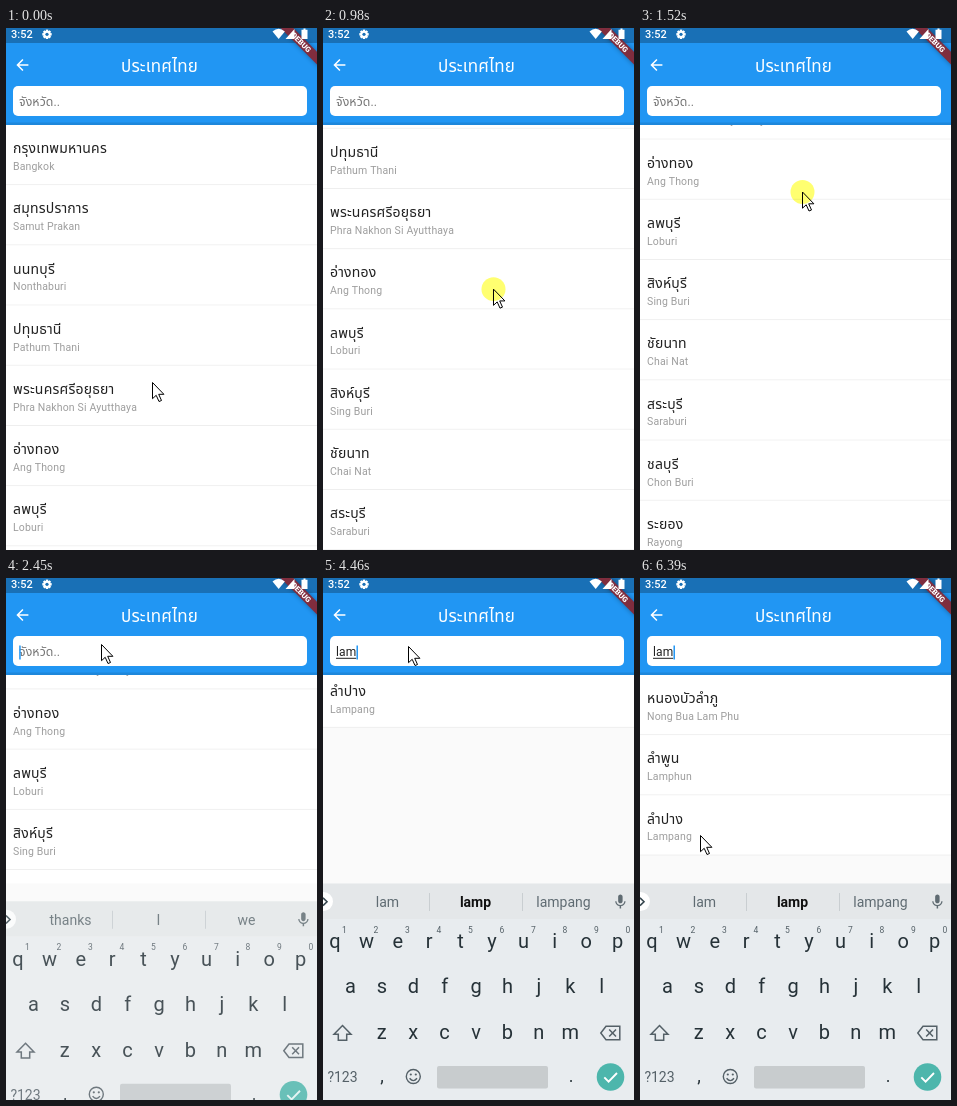
Animation of 311 by 522 pixels, one loop 6.77 s. Source, as an HTML page with a canvas:

```html
<!DOCTYPE html>
<html lang="th">
<head>
<meta charset="utf-8">
<style>
html, body { margin: 0; width: 100%; height: 100%; overflow: hidden; background: #fff; }
canvas { display: block; width: 311px; height: 522px; }
</style>
</head>
<body>
<canvas id="stage"></canvas>
<script>
const W = 311, H = 522, LOOP = 6770;
const LIST_TOP = 97, ROW = 60.2, KEYS_TOP = 305.5;
const THAI = "Roboto, 'Noto Sans Thai Looped', 'Noto Sans Thai', 'Noto Sans', sans-serif";
const LATIN = "Roboto, 'Noto Sans', sans-serif";

const FOCUS = 2345, KEYS_IN = 2400;
const TYPED = [[3915, 'l'], [4140, 'la'], [4385, 'lam']];
const PRESSES = [[560, 1660], [2130, 2310]];
const HINTS = {
  '': ['thanks', 'I', 'we'],
  l: ['l', 'lol', 'like'],
  la: ['la', 'last', 'lab'],
  lam: ['lam', 'lamp', 'lampang']
};
const PROVINCES = [
  ['กรุงเทพมหานคร', 'Bangkok'], ['สมุทรปราการ', 'Samut Prakan'],
  ['นนทบุรี', 'Nonthaburi'], ['ปทุมธานี', 'Pathum Thani'],
  ['พระนครศรีอยุธยา', 'Phra Nakhon Si Ayutthaya'], ['อ่างทอง', 'Ang Thong'],
  ['ลพบุรี', 'Loburi'], ['สิงห์บุรี', 'Sing Buri'], ['ชัยนาท', 'Chai Nat'],
  ['สระบุรี', 'Saraburi'], ['ชลบุรี', 'Chon Buri'], ['ระยอง', 'Rayong'],
  ['จันทบุรี', 'Chanthaburi'], ['หนองบัวลำภู', 'Nong Bua Lam Phu'],
  ['เลย', 'Loei'], ['กาฬสินธุ์', 'Kalasin'], ['ลำพูน', 'Lamphun'],
  ['ลำปาง', 'Lampang'], ['พิษณุโลก', 'Phitsanulok'], ['สงขลา', 'Songkhla'],
  ['พัทลุง', 'Phatthalung'], ['ยะลา', 'Yala']
];
// time, x, y of the pointer tip
const POINTER = [
  [70, 146, 354], [430, 153, 499], [540, 154, 494], [640, 156, 442],
  [980, 170, 261], [1200, 168, 200], [1360, 165, 175], [1500, 162, 163.5],
  [1660, 162, 163.5], [1980, 98, 62], [2090, 98, 62], [2130, 95, 66],
  [3200, 95, 66], [3380, 85, 68], [5500, 85, 68], [5960, 60, 257]
];

const canvas = document.getElementById('stage');
const ctx = canvas.getContext('2d');
const dpr = window.devicePixelRatio || 1;
canvas.width = W * dpr;
canvas.height = H * dpr;

function rect(x, y, w, h, fill) {
  ctx.fillStyle = fill;
  ctx.fillRect(x, y, w, h);
}

function round(x, y, w, h, r, fill) {
  ctx.beginPath();
  ctx.roundRect(x, y, w, h, r);
  ctx.fillStyle = fill;
  ctx.fill();
}

function disc(x, y, r, fill) {
  ctx.beginPath();
  ctx.arc(x, y, r, 0, 7);
  ctx.fillStyle = fill;
  ctx.fill();
}

function text(str, x, y, size, fill, { align = 'left', weight = 400, family = LATIN, gap = 0 } = {}) {
  ctx.font = `${weight} ${size}px ${family}`;
  ctx.letterSpacing = gap + 'px';
  ctx.textAlign = align;
  ctx.fillStyle = fill;
  ctx.fillText(str, x, y);
}

function icon(d, x, y, scale, fill) {
  ctx.save();
  ctx.translate(x, y);
  ctx.scale(scale, scale);
  ctx.fillStyle = fill;
  ctx.fill(new Path2D(d));
  ctx.restore();
}

function line(d, color, width) {
  ctx.strokeStyle = color;
  ctx.lineWidth = width;
  ctx.stroke(new Path2D(d));
}

// Monotone cubic through keyed values
function track(keys, col, t) {
  const n = keys.length - 1;
  if (t <= keys[0][0]) return keys[0][col];
  if (t >= keys[n][0]) return keys[n][col];
  let i = 0;
  while (keys[i + 1][0] < t) i++;
  const slope = k => k < 0 || k >= n ? 0 :
    (keys[k + 1][col] - keys[k][col]) / (keys[k + 1][0] - keys[k][0]);
  const tangent = k => {
    const a = slope(k - 1), b = slope(k);
    return a * b > 0 ? 2 * a * b / (a + b) : 0;
  };
  const span = keys[i + 1][0] - keys[i][0], u = (t - keys[i][0]) / span, v = 1 - u;
  return keys[i][col] * (1 + 2 * u) * v * v + tangent(i) * span * u * v * v +
    keys[i + 1][col] * u * u * (3 - 2 * u) - tangent(i + 1) * span * u * u * v;
}

function typedAt(t) {
  let state = [FOCUS, ''];
  for (const entry of TYPED) if (t >= entry[0]) state = entry;
  return state;
}

const matches = query => PROVINCES.filter(p => p[1].toLowerCase().includes(query));

// Overdamped settling from 1 to 0
function settle(ms) {
  const s = ms / 1000;
  return 1.7 * Math.exp(-9.08 * s) - 0.7 * Math.exp(-22.03 * s);
}

function scrollAt(t) {
  if (t < PRESSES[0][0]) return 0;
  const [, [la], [lam]] = TYPED;
  if (t < la) return Math.max(0, 450 - track(POINTER, 2, Math.min(t, 1660) - 32));
  if (t < lam) {
    const end = matches('la').length * ROW - (KEYS_TOP - LIST_TOP);
    return end + (scrollAt(la - 1) - end) * settle(t - la);
  }
  return scrollAt(lam - 1) * settle(t - lam);
}

function drawList(t, query) {
  const bottom = t < KEYS_IN ? H : KEYS_TOP;
  const scroll = scrollAt(t);
  rect(0, LIST_TOP, W, H, '#fafafa');
  ctx.save();
  ctx.beginPath();
  ctx.rect(0, LIST_TOP, W, bottom - LIST_TOP);
  ctx.clip();
  matches(query).forEach(([thai, latin], i) => {
    const y = LIST_TOP + i * ROW - scroll;
    if (y < LIST_TOP - ROW || y > bottom) return;
    rect(0, y, W, ROW, '#fff');
    rect(0, y + ROW - 1, W, 1, '#eee');
    text(thai, 7, y + 28.2, 14, '#212121', { weight: 300, family: THAI, gap: 0.19 });
    text(latin, 7, y + 45, 10.5, '#9e9e9e', { gap: 0.15 });
  });
  ctx.restore();
}

function drawBanner() {
  ctx.save();
  ctx.translate(295.3, 14.4);
  ctx.rotate(Math.PI / 4);
  ctx.shadowColor = 'rgba(0,0,0,.35)';
  ctx.shadowBlur = 5 * dpr;
  rect(-30, -4.5, 60, 9, 'rgb(127,45,62)');
  ctx.shadowColor = 'transparent';
  text('DEBUG', 0, 2.7, 7.6, '#fff', { align: 'center', weight: 900 });
  ctx.restore();
}

function drawStatus() {
  text('3:52', 5, 10.4, 11, '#fff', { weight: 500 });
  ctx.save();
  ctx.translate(41, 6.3);
  for (let i = 0; i < 4; i++) {
    rect(-1.2, -4.7, 2.4, 9.4, '#fff');
    ctx.rotate(Math.PI / 4);
  }
  ctx.restore();
  disc(41, 6.3, 3.6, '#fff');
  disc(41, 6.3, 1.6, '#1970b6');
  icon('M0 3Q6.5 -2.5 13 3L6.5 11Z', 266.5, 0.6, 0.95, '#fff');
  icon('M9 0V10H0Z', 279.5, 1, 1, '#fff');
  icon('M2 0H4V1.2H6V10.5H0V1.2H2Z', 295.5, 0.6, 1, '#fff');
}

function drawHeader(t, since, query) {
  rect(0, 0, W, LIST_TOP, '#2196f3');
  rect(0, 94.5, W, 2.5, '#1d87db');
  rect(0, 0, W, 15, '#1970b6');
  icon('M20 11H7.83l5.59-5.59L12 4l-8 8 8 8 1.41-1.41L7.83 13H20z', 7.4, 28, 0.75, '#fff');
  text('ประเทศไทย', 153.5, 44, 17, '#fff', { align: 'center', family: THAI, gap: 0.11 });
  round(7, 58, 294, 30, 5, '#fff');
  if (query) {
    text(query, 13, 78.3, 12, '#212121', { gap: 0.1 });
    rect(13, 79.8, ctx.measureText(query).width, 1, '#212121');
  } else {
    text('จังหวัด..', 13, 78.3, 12.3, '#757575', { family: THAI, gap: 0.1 });
  }
  if (t >= FOCUS && (t - since) % 1000 < 500) {
    const x = 13.2 + (query ? ctx.measureText(query).width : 0);
    rect(x, 67.5, 1.5, 14, '#2196f3');
  }
  drawBanner();
  drawStatus();
}

function drawHints(query) {
  const grey = '#5f6b72';
  rect(0, KEYS_TOP, W, 35.5, '#e4e7e9');
  rect(106, 315, 1, 18, '#c9ced1');
  rect(199, 315, 1, 18, '#c9ced1');
  disc(0.5, 323.5, 9.5, '#fff');
  line('M0 319.8L4 323.7L0 327.6', '#37474f', 1.6);
  HINTS[query].forEach((word, i) => {
    const best = i === 1 && query;
    text(word, [64.5, 152.5, 240.5][i], 329, 14, best ? '#111' : grey,
      { align: 'center', weight: best ? 700 : 400 });
  });
  icon('M12 14c1.66 0 3-1.34 3-3V5c0-1.66-1.34-3-3-3S9 3.34 9 5v6c0 1.66 1.34 3 3 3z' +
    'M17.3 11c0 3-2.54 5.1-5.3 5.1S6.7 14 6.7 11H5c0 3.41 2.72 6.23 6 6.72V21h2v-3.28' +
    'c3.28-.48 6-3.3 6-6.72z', 288.5, 315, 0.74, grey);
}

function drawKeys() {
  const ink = '#263238', grey = '#546067';
  const mid = { align: 'center' };
  rect(0, 341, W, 240, '#e8ecef');
  [['qwertyuiop', 12, 370], ['asdfghjkl', 27.5, 415], ['zxcvbnm', 58.8, 461]].forEach(([row, x, y]) => {
    [...row].forEach((key, i) => text(key, x + i * 31.4, y, 20, ink, mid));
  });
  for (let i = 0; i < 10; i++) text((i + 1) % 10, 21.5 + i * 31.5, 354.5, 8.5, grey, mid);
  line('M19.5 447.5L28 456.2H23.7V462.3H15.3V456.2H11Z', grey, 1.5);
  line('M277.8 455L283 448.3H296.8V461.7H283ZM286.2 451.5L293 458.5M293 451.5L286.2 458.5', grey, 1.5);
  text('?123', 19.5, 504, 14, grey, mid);
  text(',', 59, 504, 18, ink, mid);
  text('.', 248, 504, 18, ink, mid);
  line('M97.3 498.5A7 7 0 1 1 83.3 498.5A7 7 0 1 1 97.3 498.5M86.6 500.3Q90.3 505 94 500.3', grey, 1.4);
  disc(87.8, 496.5, 1.1, grey);
  disc(92.8, 496.5, 1.1, grey);
  round(114, 488, 111, 22.5, 2, '#c8ccce');
  disc(287.5, 499, 13.8, '#4db6ac');
  line('M281.3 499.3L285.6 503.6L294 495', '#fff', 1.9);
}

function drawKeyboard(t) {
  if (t < KEYS_IN) return;
  const rest = 1 - Math.min(1, (t - KEYS_IN) / 200);
  ctx.save();
  ctx.globalAlpha = 1 - rest ** 6;
  ctx.translate(0, 43 * rest ** 3);
  drawHints(typedAt(t - 60)[1]);
  drawKeys();
  ctx.restore();
}

function drawPointer(t) {
  const x = track(POINTER, 1, t), y = track(POINTER, 2, t);
  const arrow = new Path2D('M0 0V16.2L3.7 12.8L6.5 19L9 18L6.2 11.8H11.4Z');
  ctx.save();
  ctx.translate(x + 0.5, y + 0.5);
  ctx.fillStyle = '#fff';
  ctx.fill(arrow);
  ctx.strokeStyle = '#000';
  ctx.lineWidth = 1;
  ctx.stroke(arrow);
  ctx.globalCompositeOperation = 'multiply';
  if (PRESSES.some(([down, up]) => t >= down && t < up)) disc(0, 0, 12, '#ffff70');
  ctx.restore();
}

function draw(t) {
  const [since, query] = typedAt(t);
  ctx.setTransform(dpr, 0, 0, dpr, 0, 0);
  drawList(t, query);
  drawHeader(t, since, query);
  drawKeyboard(t);
  drawPointer(t);
}

const start = performance.now();
function frame() {
  draw((performance.now() - start) % LOOP);
  requestAnimationFrame(frame);
}
frame();
</script>
</body>
</html>
```
